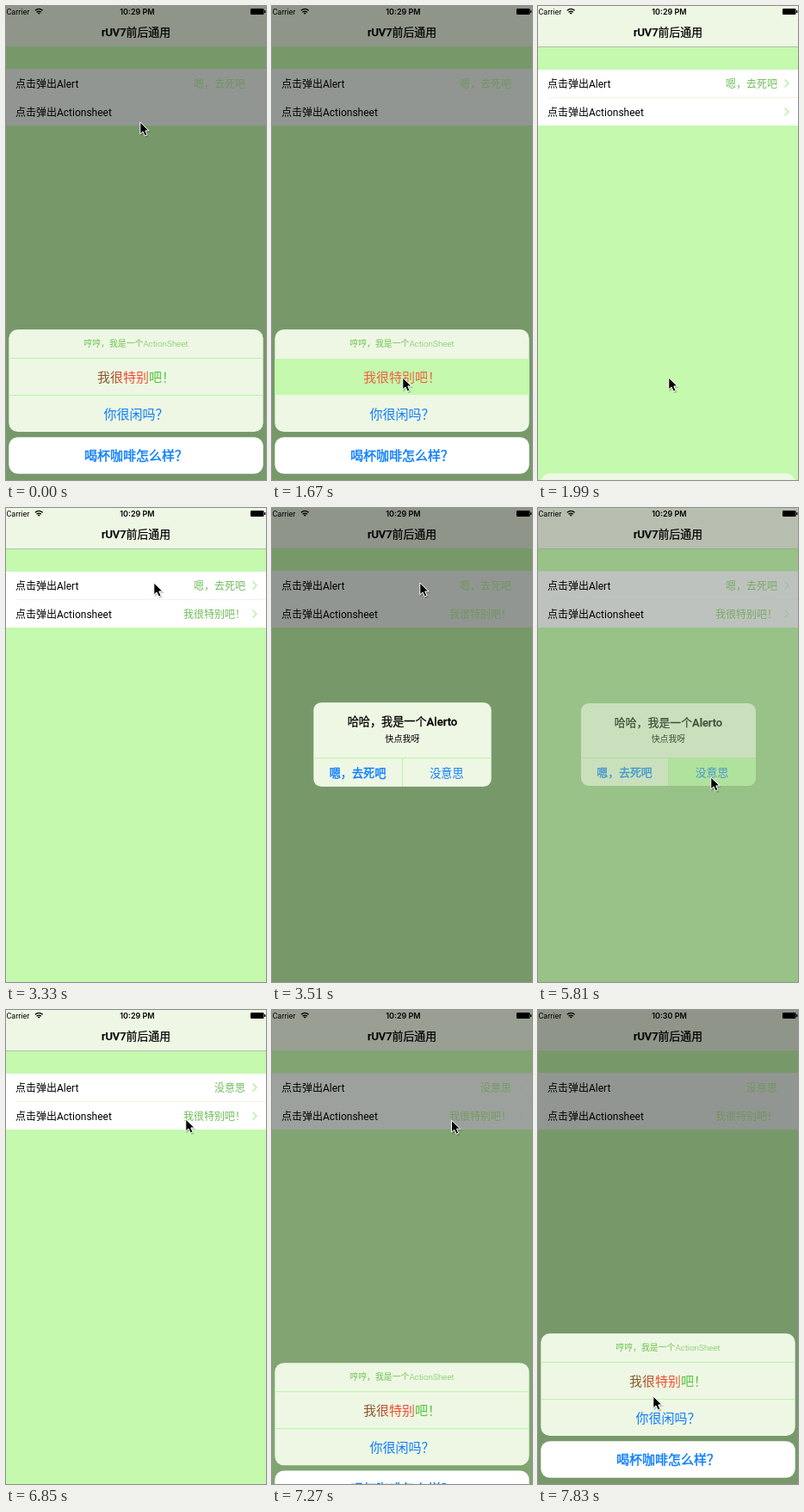
An HTML page that plays this animation: 302x551 px, repeating every 8000 ms.

```html
<!DOCTYPE html>
<html lang="zh-CN">
<head>
<meta charset="utf-8">
<title>Alert and action sheet</title>
<style>
html, body { margin: 0; width: 100%; height: 100%; overflow: hidden; background: #c4f9ae; }
svg { display: block; width: 100%; height: 100%; }
text { font: 12px Roboto, "Noto Sans CJK SC", "Noto Sans CJK", sans-serif; }
.mid { text-anchor: middle; }
.medium { font-weight: 500; stroke: #000; stroke-width: .25; }
.detail { text-anchor: end; font-weight: 300; }
.px13 { font-size: 12.9px; }
.px15 { font-size: 15px; }
.px10 { font-size: 9.9px; }
.px9 { font-size: 9px; }
.blue { fill: #0a7cff; }
.blue.medium { stroke: #0a7cff; stroke-width: .4; }
.panel { fill: #eef7e4; }
.line { stroke: #bdf3a6; fill: none; }
.press { fill: #c4f9ae; }
.caption { font-weight: 300; fill: #6cc24e; }
#clock { font-family: Inter, sans-serif; font-weight: 600; }
</style>
</head>
<body>
<svg viewBox="0 0 302 551">
  <defs>
    <clipPath id="alertShape"><rect x="50" y="227" width="203" height="96" rx="9"/></clipPath>
    <linearGradient id="mixed">
      <stop offset=".15" stop-color="#8a5a2c"/>
      <stop offset=".38" stop-color="#f04a28"/>
      <stop offset=".62" stop-color="#ff4630"/>
      <stop offset=".7" stop-color="#4fc83c"/>
    </linearGradient>
  </defs>

  <rect id="page" width="302" height="551"/>
  <rect width="302" height="47" class="panel"/>
  <text x="0.5" y="10" class="px9">Carrier</text>
  <g fill="none" stroke="#000" stroke-width="1.3">
    <path d="M33.8 5.3Q38.2 1.4 42.6 5.3M35.5 7.2Q38.2 4.9 40.9 7.2"/>
    <path d="M36.7 8.2Q38.2 7 39.7 8.2L38.2 9.8Z" fill="#000" stroke="none"/>
  </g>
  <text id="clock" x="152.5" y="10" class="mid px9"></text>
  <rect x="284" y="3" width="15.5" height="7" rx="1.2"/>
  <rect x="300" y="5" width="1.4" height="3" rx=".6"/>
  <text x="151" y="35" class="mid medium px13">rUV7前后通用</text>

  <rect id="cells" y="73" width="302" height="66"/>
  <g id="trim" fill="none">
    <path d="M0 47.5H302" stroke="#b3bdac"/>
    <path d="M0 73.5H302" stroke="#c4f9ae"/>
    <path d="M12 106.5H302" stroke="#eef5e2"/>
    <path d="M286.5 85.5l4.5 4.5l-4.5 4.5M286.5 118.500l4.5 4.5l-4.5 4.5" stroke="#b4ee9c" stroke-width="1.3"/>
  </g>
  <text x="11" y="94.5">点击弹出Alert</text>
  <text x="11" y="127.5">点击弹出Actionsheet</text>
  <g id="details">
    <text id="firstChoice" x="278" y="94.5" class="detail">嗯，去死吧</text>
    <text id="secondChoice" x="278" y="94.5" class="detail">没意思</text>
    <text id="sheetChoice" x="278" y="127.5" class="detail">我很特别吧！</text>
  </g>

  <rect id="dim" width="302" height="551"/>

  <g id="sheet">
    <rect x="3.3" y="376" width="295.4" height="119" rx="10.500" class="panel"/>
    <path id="sheetLines" d="M3.3 409.5H298.7M3.3 452.5H298.7" class="line"/>
    <rect id="sheetPress" x="3.3" y="410" width="295.4" height="42" class="press"/>
    <text x="151" y="396" class="mid px10 caption">哼哼，我是一个ActionSheet</text>
    <text id="special" x="151" y="437" class="mid px15">我很特别吧！</text>
    <text x="151" y="479.5" class="mid px15 blue">你很闲吗？</text>
    <rect x="3.3" y="501.2" width="295.4" height="42.6" rx="10.500" fill="#fff"/>
    <text x="151" y="528" class="mid px15 medium blue">喝杯咖啡怎么样？</text>
  </g>

  <g id="alert">
    <g clip-path="url(#alertShape)">
      <rect x="50" y="227" width="203" height="96" class="panel"/>
      <rect id="alertPress" x="152" y="291" width="101" height="32" class="press"/>
      <path d="M50 290.5H253M151.5 290V323" class="line"/>
    </g>
    <text x="151.5" y="253.5" class="mid medium px13">哈哈，我是一个Alerto</text>
    <text x="151.5" y="272" class="mid px10">快点我呀</text>
    <text x="100.500" y="312" class="mid medium px13 blue">嗯，去死吧</text>
    <text x="202" y="312" class="mid px13 blue">没意思</text>
  </g>

  <g id="cursor">
    <path d="M1.5 2.5V17.5L5 14.5L7.5 19L10.5 18L8.5 13H13Z" opacity=".2"/>
    <path d="M.8 1V14.8L4 11.9L6.4 17L9 15.9L6.8 10.9H11Z" stroke="#fff" stroke-linejoin="round"/>
  </g>
</svg>
<script>
const LOOP = 8000;
const el = Object.fromEntries([...document.querySelectorAll('[id]')].map(e => [e.id, e]));

const clamp = v => Math.min(1, Math.max(0, v));
const ramp = (t, from, to) => clamp((t - from) / (to - from));
const between = (t, from, to) => t >= from && t < to;
const mix = (a, b, k) => `rgb(${a.map((v, i) => Math.round(v + (b[i] - v) * k))})`;

// Critically damped system animation
function spring(ms) {
  const x = Math.max(0, ms) * 0.0215;
  return 1 - (1 + x) * Math.exp(-x);
}

// Fades reach their ends a little before the spring settles
const fade = k => ramp(k, 0.06, 0.9);

// Pointer moves: start, end, target x, target y, sideways bend x, y
const START = [155, 134];
const MOVES = [
  [10, 850, 151, 425, 5, 0],
  [870, 1130, 151, 431, 0, 0],
  [2020, 2450, 215, 157, 0, 0],
  [2460, 3030, 171, 86, 0, 0],
  [3650, 4130, 141, 301, 0, 0],
  [4140, 4590, 91, 307, 0, 8],
  [4780, 5350, 200, 312, 0, 0],
  [5850, 6410, 256, 148, 0, 0],
  [6440, 6850, 208, 126, 0, 0],
  [7250, 7830, 133, 448, 0, 0]
];

function pointerAt(t) {
  let [x, y] = START;
  for (const [from, to, tx, ty, bx, by] of MOVES) {
    if (t < from) break;
    const u = ramp(t, from, to);
    const k = u * u * (3 - 2 * u);
    const bend = Math.sin(Math.PI * k);
    x += (tx - x) * k + bx * bend;
    y += (ty - y) * k + by * bend;
  }
  return [x, y];
}

const show = (node, opacity) => node.setAttribute('opacity', opacity);

function draw(now) {
  const t = now % LOOP;
  const sheetOpen = 1 - spring(t - 1770) + spring(t - 7130);
  const alertIn = spring(t - 3325);
  const alertOpen = alertIn - spring(t - 5740);
  const dim = fade(sheetOpen + alertOpen);

  el.clock.textContent = t < 7450 ? '10:29 PM' : '10:30 PM';
  show(el.dim, 0.4 * dim);
  show(el.trim, 1 - dim);
  el.page.setAttribute('fill', mix([196, 249, 174], [198, 255, 177], dim));
  el.cells.setAttribute('fill', mix([255, 255, 255], [242, 249, 242], dim));
  el.details.setAttribute('fill', mix([112, 188, 90], [185, 248, 158], dim));

  const swap = ramp(t, 6140, 6410);
  show(el.firstChoice, 1 - swap);
  show(el.secondChoice, swap);
  show(el.sheetChoice, ramp(t, 2170, 2450));

  const sheetPressed = between(t, 1670, 1780);
  el.sheet.setAttribute('transform', `translate(0 ${176 * (1 - sheetOpen)})`);
  show(el.sheetPress, +sheetPressed);
  show(el.sheetLines, +!sheetPressed);
  el.special.setAttribute('fill', sheetPressed ? '#f0623c' : 'url(#mixed)');

  const scale = 1 + 0.2 * (1 - alertIn);
  el.alert.setAttribute('transform', `translate(151.5 275) scale(${scale}) translate(-151.5 -275)`);
  show(el.alert, fade(alertOpen));
  show(el.alertPress, +between(t, 5690, 5900));

  el.cursor.setAttribute('transform', `translate(${pointerAt(t)})`);
  requestAnimationFrame(draw);
}
requestAnimationFrame(draw);
</script>
</body>
</html>
```
